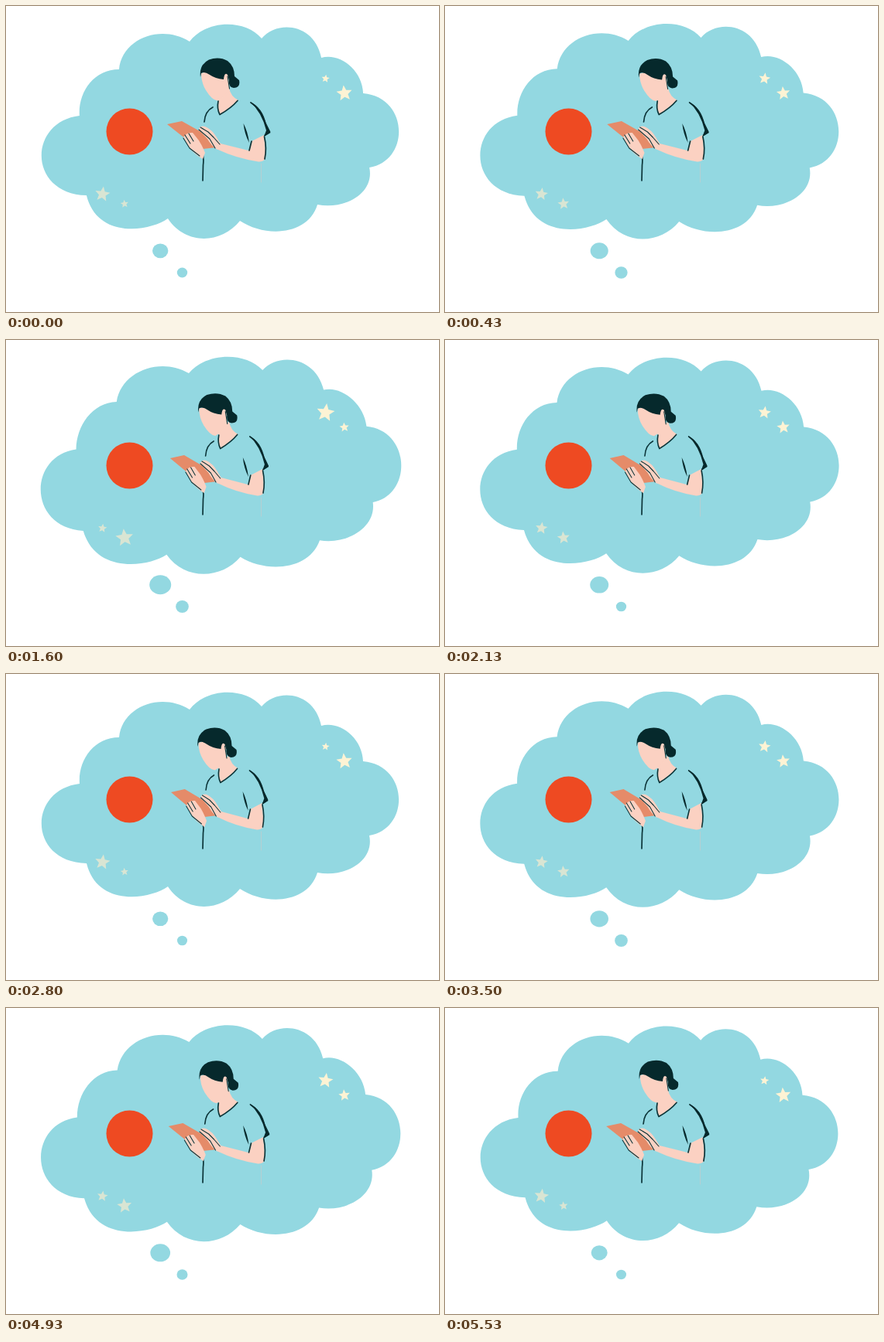
Animation, 559 px wide and 396 px high, one loop 5.61 s. Source, as an HTML page:

```html
<!DOCTYPE html>
<html lang="en">
<head>
<meta charset="utf-8">
<title>Thought cloud</title>
<style>
html, body { margin: 0; width: 100%; height: 100%; overflow: hidden; background: #fff; }
svg { display: block; }
.skin { fill: #fbd1c2; }
.ink { fill: #06292c; }
.line { fill: none; stroke: #0b3438; stroke-width: 1.7; stroke-linecap: round; stroke-linejoin: round; }
.thin { stroke-width: 1.1; }
</style>
</head>
<body>
<svg width="559" height="396" viewBox="0 0 559 396">
  <g fill="#93d8e1">
    <path id="cloud"/>
    <ellipse id="dotBig" cx="199.2" cy="316.8"/>
    <ellipse id="dotSmall" cx="227.5" cy="345"/>
  </g>
  <g id="stars"></g>
  <circle cx="159.5" cy="162.5" r="30" fill="#ee4a22"/>

  <path class="line" d="M252 184Q256 194 254.500 206L254 226"/>
  <path class="line thin" d="M329.500 204V228" style="stroke:#b4d0d3"/>
  <g id="body">
    <path class="skin" d="M272 112L288 106Q290 117 300 122L277 141L273 134Q276 126 272 118Z"/>
    <path class="line" d="M274 123Q272 133 276 140.500Q291 132 299 122.500"/>
    <path class="line" d="M267 131Q257 136 256 150"/>
    <path class="line" d="M316 125Q328 132 334 150L340.500 163L334 167.500"/>
    <path class="ink" d="M315 124Q331 131 336 153L341.500 164L333 169L336 161Q330 137 315 124Z"/>
    <path class="ink" d="M306.500 152Q308 166 314 177Q312 162 306.500 152Z"/>
    <path class="skin" d="M333 167L335.500 195Q334 202 326 201.500Q297 197 274 186Q262 179 249 161Q249 155 256 156Q264 159 269 167L277 178L313 187L317 175Z"/>
    <path class="line" d="M333.500 169Q337 184 334 198M317 175L314 187"/>
    <path fill="#e58b69" d="M208 153L227 149L259 167L272 183L249 185.500Z"/>
    <path class="skin" d="M229 170Q233 163 241 164L249 174Q254 182 257 190L254 198Q244 192 237 184Z"/>
    <path class="skin" d="M249 160Q250 155 257 156Q266 160 272 170L277 179L273 186Q265 181 260 172Z"/>
    <path class="line thin" d="M229 171L237 184L250 194M231 167L238 178M236 165L242 175M249 160L263 172L270 184M251 157L261 163L268 170L276 179"/>
  </g>
  <g id="head">
    <path class="skin" d="M252 87L261 85L287 85L288 107Q282 118 273 122.500Q266 122 258 109Q252 99 252 87Z"/>
    <path class="ink" d="M251 92Q249 76 262 69.500Q275 65 286 71Q295 78 295 91L301 96Q303 106 294 106Q287 105 288 96L286 89Q282 85 281 95Q270 94 263 89Q256 84 252 87Z"/>
    <path class="line thin" d="M286 91L288.500 107"/>
  </g>
</svg>
<script>
const LOOP = 5610, PULSE = 3000, CENTER = [278, 165];
const $ = id => document.getElementById(id);

// Each lobe: two control points, then the notch where it ends.
const START = [104, 245];
const LOBES = [
  [28, 243, 28, 150, 95, 142],
  [93, 112, 113, 82, 146, 82],
  [150, 42, 200, 23, 237, 46],
  [258, 18, 308, 16, 330, 42],
  [350, 18, 398, 22, 407, 67],
  [430, 60, 460, 82, 461, 113],
  [520, 118, 522, 200, 469, 209],
  [476, 242, 438, 264, 402, 257],
  [390, 297, 335, 300, 302, 278],
  [278, 308, 232, 310, 209, 275],
  [185, 292, 118, 302, ...START]
];

// x, y, resting radius, growth, tilt, colour
const STARS = [
  [412.5, 94, 5.2, 7.4, 8, "#fdf3d4"],
  [436.8, 113, 10.7, -4.6, -6, "#fdf3d4"],
  [124.5, 243.5, 10.2, -4.6, 8, "#d9e5d3"],
  [153, 256, 5.2, 7.2, -6, "#d9e5d3"]
];

const starPoints = Array.from({ length: 10 }, (_, i) => {
  const r = i % 2 ? 0.45 : 1, a = i * Math.PI / 5;
  return `${r * Math.sin(a)},${-r * Math.cos(a)}`;
}).join(" ");

const starNodes = STARS.map(s => {
  const node = document.createElementNS("http://www.w3.org/2000/svg", "polygon");
  node.setAttribute("points", starPoints);
  node.setAttribute("fill", s[5]);
  return $("stars").appendChild(node);
});

const wave = (t, peak) => (1 + Math.cos(2 * Math.PI * (t - peak) / PULSE)) / 2;

// Notches spread further than the lobes' crowns.
function cloudPath(v) {
  const grow = (n, i, rate) => CENTER[i % 2] + (n - CENTER[i % 2]) * (1 + rate * v);
  const lobe = (c, k) => "C" + c.map((n, i) => grow(n, i, i > 3 ? 0.026 : k ? 0.012 : 0));
  return "M" + START.map((n, i) => grow(n, i, 0.026)) + LOBES.map(lobe).join("") + "Z";
}

function setDot(id, rx, ry) {
  $(id).setAttribute("rx", rx);
  $(id).setAttribute("ry", ry);
}

function draw(now) {
  // Steps alternate between 30 and 70 ms, covering 50 ms of motion each.
  const ms = now % LOOP;
  const step = Math.min(111, Math.floor(ms / 100) * 2 + (ms % 100 >= 30 ? 1 : 0));
  const t = step * 50;
  const v = wave(t, 1350), sway = Math.sin(Math.PI * t / LOOP);

  $("cloud").setAttribute("d", cloudPath(v));
  setDot("dotBig", 10.1 + 4.2 * v, 9.3 + 3.4 * v);
  const small = 6.5 + 3.5 * wave(t, 1050) ** 1.8;
  setDot("dotSmall", small, small * 0.96);

  STARS.forEach(([x, y, r, growth, tilt], i) =>
    starNodes[i].setAttribute("transform", `translate(${x} ${y}) rotate(${tilt}) scale(${r + growth * v})`));

  $("body").setAttribute("transform", `translate(291 0) scale(${1 - 0.06 * sway} 1) translate(-291 0)`);
  $("head").setAttribute("transform", `translate(${-3.5 * sway} ${2 * sway})`);
}

const begin = performance.now();
function tick() {
  draw(performance.now() - begin);
  requestAnimationFrame(tick);
}
tick();
</script>
</body>
</html>
```
